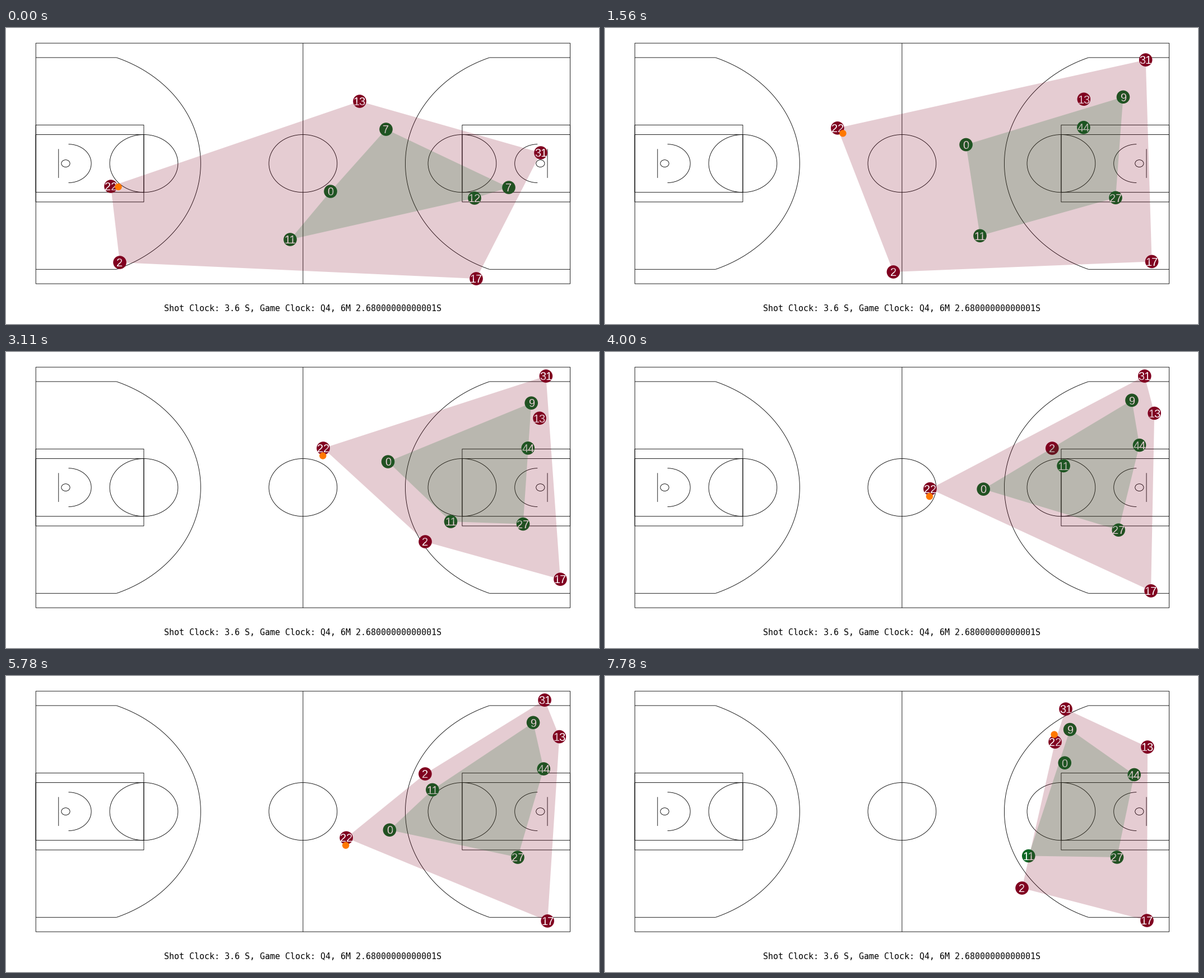
A matplotlib script for the animation above (8000 ms loop, 1058 by 529 pixels).

```python
import numpy as np
import matplotlib.pyplot as plt
from matplotlib.animation import FuncAnimation
from matplotlib.patches import Circle, Ellipse, Polygon, Rectangle

W, H, DPI = 1058, 529, 100
LOOP_MS, TICK_MS, STEPS = 8000, 50, 36
RED, GREEN, ORANGE = "#800020", "#0b6623", "#ff7800"
RADIUS, BALL_RADIUS = 11.8, 6.2
PAINT = np.array([860, 242])  # the spot the defence protects
SWAP_STEP = 7  # substitutions change three of the green numbers
steps = np.arange(STEPS)


def slopes(t, y):
    """Slopes for a cubic that does not overshoot its waypoints."""
    d = np.diff(y, axis=0) / np.diff(t)[:, None]
    same_sign = d[:-1] * d[1:] > 0
    total = np.where(same_sign, d[:-1] + d[1:], 1)
    inner = np.where(same_sign, 2 * d[:-1] * d[1:] / total, 0)
    return np.vstack([d[:1], inner, d[-1:]])


def run(*waypoints):
    """Attacker: a smooth path through a few (step, x, y) waypoints."""
    points = np.array(waypoints, float)
    t, y = points[:, 0], points[:, 1:]
    m = slopes(t, y)
    k = np.clip(np.searchsorted(t, steps, side="right") - 1, 0, len(t) - 2)
    h = (t[k + 1] - t[k])[:, None]
    u = (steps - t[k])[:, None] / h
    return ((1 + 2 * u) * (1 - u) ** 2 * y[k] + u * (1 - u) ** 2 * h * m[k]
            + u * u * (3 - 2 * u) * y[k + 1] + u * u * (u - 1) * h * m[k + 1])


def guard(man, start, lean):
    """Defender: recovers from start to a spot between his man and the paint."""
    spot = man + np.array(lean) * (PAINT - man)
    lag = np.exp(-(steps / 9) ** 1.5)[:, None]
    return spot + lag * (np.array(start) - spot[0])


def dribble(carrier):
    """The ball swings around its carrier, then to his far side on the drive."""
    def ease(a, b):
        u = np.clip((steps - a) / (b - a), 0, 1)
        return u * u * (3 - 2 * u)
    angle = np.radians(4 + 90 * ease(0, 15) - 190 * ease(29, 35))
    return carrier + 13.5 * np.column_stack([np.cos(angle), np.sin(angle)])


def hull(points):
    """Convex hull by the monotone chain method."""
    def chain(pts):
        out = []
        for p in pts:
            while len(out) > 1:
                (ax, ay), (bx, by) = out[-2:]
                if (bx - ax) * (p[1] - ay) - (by - ay) * (p[0] - ax) > 0:
                    break
                out.pop()
            out.append(p)
        return out[:-1]
    pts = sorted(map(tuple, points))
    return chain(pts) + chain(pts[::-1])


fig = plt.figure(figsize=(W / DPI, H / DPI), dpi=DPI, facecolor="white")
ax = fig.add_axes([0, 0, 1, 1])
ax.set(xlim=(0, W), ylim=(H, 0))
ax.axis("off")

# The court, measured in feet and stretched to the stage.
LEFT, TOP, COURT_W, COURT_H = 53.2, 27.1, 953.4, 430
FX, FY = COURT_W / 94, COURT_H / 50
MID_X, MID_Y = LEFT + COURT_W / 2, TOP + COURT_H / 2
STROKE = dict(lw=0.62, zorder=1, snap=False)
EDGE = dict(fill=False, ec="black", **STROKE)


def line(x, y):
    ax.plot(x, y, color="black", solid_capstyle="butt", **STROKE)


def ellipse(x, feet):
    ax.add_patch(Ellipse((x, MID_Y), 2 * feet * FX, 2 * feet * FY, **EDGE))


def draw_half(side):
    def px(feet):
        return MID_X + side * (47 - feet) * FX

    def box(feet, half):
        ax.add_patch(Rectangle((px(0), MID_Y - half * FY), px(feet) - px(0),
                               2 * half * FY, **EDGE))

    def arc(center, radius, limit):
        a = np.linspace(-limit, limit, 120)
        line(px(center + radius * np.cos(a)), MID_Y + radius * FY * np.sin(a))

    box(19, 8)
    box(19, 6)
    ellipse(px(19), 6)
    ellipse(px(5.25), 0.75)
    line([px(4)] * 2, [MID_Y - 3 * FY, MID_Y + 3 * FY])
    arc(5.75, 4, np.pi / 2)
    limit = np.arcsin(22 / 23.75)
    arc(5.25, 23.75, limit)
    corner = px(5.25 + 23.75 * np.cos(limit))
    for sign in (-1, 1):
        line([px(0), corner], [MID_Y + sign * 22 * FY] * 2)


ax.add_patch(Rectangle((LEFT, TOP), COURT_W, COURT_H, **EDGE))
line([MID_X] * 2, [TOP, TOP + COURT_H])
ellipse(MID_X, 6)
draw_half(-1)
draw_half(1)
ax.text(530, 506, "Shot Clock: 3.6 S, Game Clock: Q4, 6M 2.68000000000001S",
        family="DejaVu Sans Mono", size=15 * 72 / DPI, ha="center", va="baseline")


class Player:
    def __init__(self, color, z, path, number, substitute=None):
        self.path = path
        self.numbers = number, number if substitute is None else substitute
        self.dot = ax.add_patch(Circle((0, 0), RADIUS, fc=color, ec="none", zorder=z))
        self.label = ax.text(0, 0, "", color="white", family="Liberation Sans",
                             size=20 * 72 / DPI, ha="center", va="baseline", zorder=z + 0.5)

    def move(self, step):
        x, y = self.path[step]
        self.dot.center = x, y
        self.label.set_position((x, y + 7.3))
        self.label.set_text(str(self.numbers[step >= SWAP_STEP]))


handler = run((0, 187, 283), (10, 495, 160), (14, 566, 172), (22, 591, 307),
              (29, 627, 261), (35, 803, 118))
cutter = run((0, 203, 419), (10, 631, 439), (14, 748, 339), (22, 820, 63),
             (29, 701, 282), (35, 744, 379))
wing = run((0, 631, 131), (10, 913, 125), (22, 991, 105), (35, 968, 127))
top_corner = run((0, 954, 223), (4, 965, 90), (10, 964, 43), (29, 960, 43), (35, 822, 59))
low_corner = run((0, 839, 448), (4, 932, 443), (10, 997, 395), (22, 966, 438), (35, 967, 437))

home = [Player(RED, 2, handler, 22), Player(RED, 3, cutter, 2), Player(RED, 4, wing, 13),
        Player(RED, 5, top_corner, 31), Player(RED, 6, low_corner, 17)]
away = [Player(GREEN, 10, guard(wing, (678, 181), (0.22, 0.43)), 7, 44),
        Player(GREEN, 11, guard(handler, (579, 292), (0.3, 0.3)), 0),
        Player(GREEN, 12, guard(cutter, (507, 378), (0.1, 0.42)), 11),
        Player(GREEN, 13, guard(low_corner, (836, 304), (0.5, 0.58)), 12, 27),
        Player(GREEN, 14, guard(top_corner, (897, 285), (0.2, 0.2)), 7, 9)]
areas = [ax.add_patch(Polygon([(0, 0)] * 3, fc=c, ec="none", alpha=0.2, zorder=z))
         for c, z in ((RED, 20), (GREEN, 21))]
ball = ax.add_patch(Circle((0, 0), BALL_RADIUS, fc=ORANGE, ec="none", zorder=22))
ball_path = dribble(handler)


def update(frame):
    # Each picture holds for one step; the ticks only time the changes.
    step = int((frame * TICK_MS + 45) * STEPS / LOOP_MS)
    for team, area in zip((home, away), areas):
        for player in team:
            player.move(step)
        area.set_xy(hull([p.path[step] for p in team]))
    ball.center = ball_path[step]
    return []


anim = FuncAnimation(fig, update, frames=LOOP_MS // TICK_MS, interval=TICK_MS,
                     repeat=True, repeat_delay=0, blit=False)
plt.show()
```
